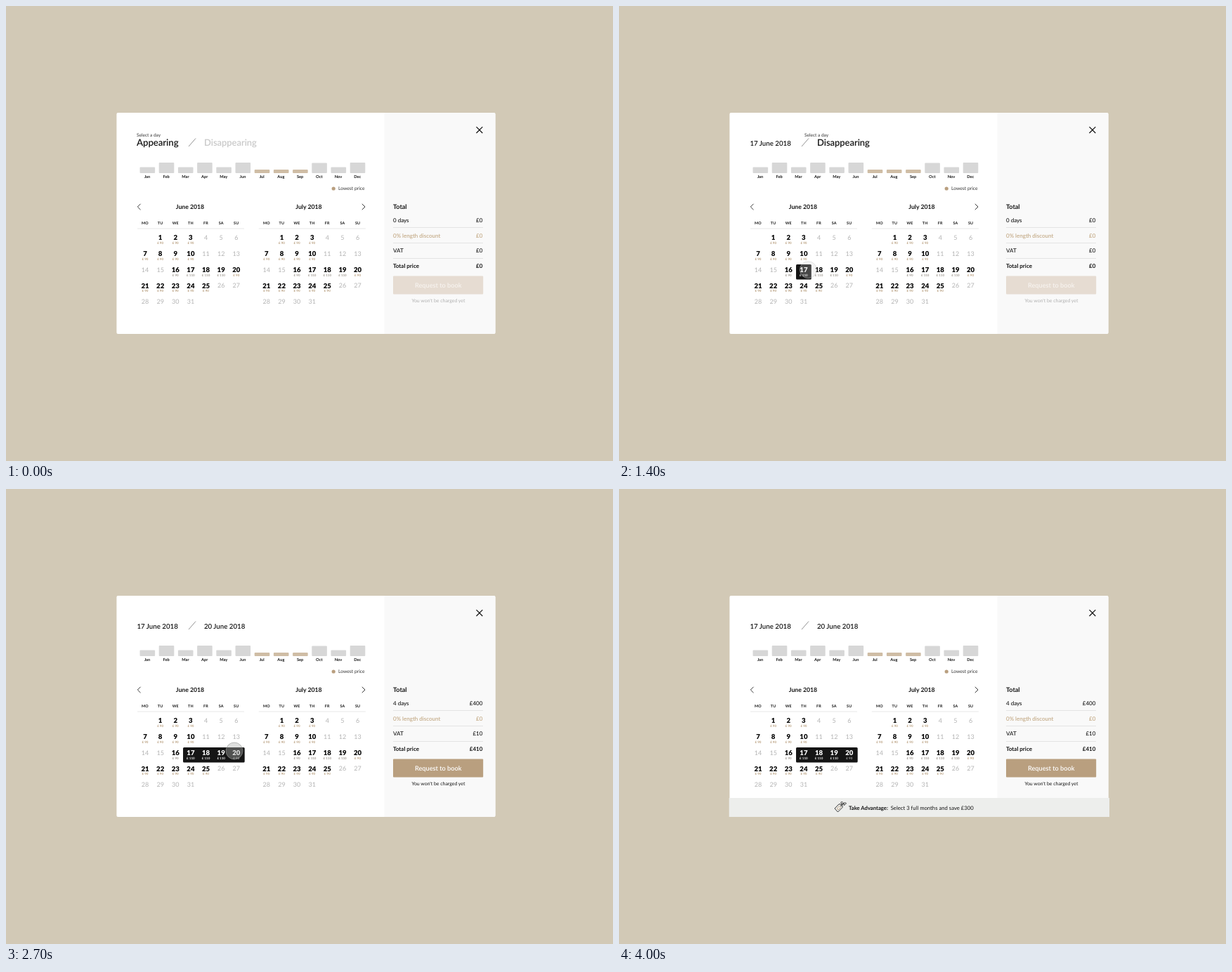
Recreate the animation shown at these times as an HTML page with a canvas. Size 864 by 648 pixels, loop 4660 ms.

```html
<!DOCTYPE html>
<html lang="en">
<head>
<meta charset="utf-8">
<title>Booking calendar</title>
<style>
html, body { margin: 0; width: 100%; height: 100%; overflow: hidden; background: #d2c9b6; }
canvas { display: block; }
</style>
</head>
<body>
<canvas id="stage" width="864" height="648"></canvas>
<script>
const ctx = document.getElementById('stage').getContext('2d');
const LOOP = 4660;
const INK = '#151515', TAN = '#b99f7f', PALE = '#b4b4b4', RULE = '#e2e2e2';
const PICK_START = 1240, PICK_END = 2540;

const clamp = v => Math.min(1, Math.max(0, v));
const span = (t, from, to) => clamp((t - from) / (to - from));
const lerp = (a, b, k) => a + (b - a) * k;
const easeOut = (k, power = 2) => 1 - (1 - k) ** power;
const easeInOut = k => k < .5 ? 4 * k ** 3 : 1 - 4 * (1 - k) ** 3;
const mix = (a, b, k) => `rgb(${a.map((v, i) => Math.round(lerp(v, b[i], k)))})`;

function text(str, x, y, size, { weight = 400, color = INK, align = 'left', spacing = 0 } = {}) {
  ctx.font = `${weight} ${size}px Lato, sans-serif`;
  ctx.letterSpacing = spacing + 'px';
  ctx.textAlign = align;
  ctx.fillStyle = color;
  ctx.fillText(str, x, y);
}

function box(x, y, w, h, color, radius = 0) {
  ctx.fillStyle = color;
  ctx.beginPath();
  ctx.roundRect(x, y, w, h, radius);
  ctx.fill();
}

function line(points, color, width = 1) {
  ctx.strokeStyle = color;
  ctx.lineWidth = width;
  ctx.beginPath();
  points.forEach(([x, y]) => ctx.lineTo(x, y));
  ctx.stroke();
}

function disc(x, y, r, color) {
  ctx.fillStyle = color;
  ctx.beginPath();
  ctx.arc(x, y, r, 0, 7);
  ctx.fill();
}

function drawHeading(t) {
  const started = t >= PICK_START, ended = t >= PICK_END;
  const title = { weight: 600, spacing: -.05 };
  if (started) text('17 June 2018', 186.5, 199, 9.7, { weight: 600 });
  else text('Appearing', 186, 199, 13.2, title);

  if (ended) text('20 June 2018', 282, 199, 9.7, { weight: 600 });
  else text('Disappearing', 282, 199, 13, { ...title, color: started ? INK : '#c9c9c9' });

  const slide = easeOut(span(t, PICK_START, 1540), 2.2);
  ctx.globalAlpha = 1 - span(t, PICK_END, 2640);
  text('Select a day', lerp(186, 282, slide), 186, 6.5, { color: '#333' });
  ctx.globalAlpha = 1;
  line([[260, 200], [270, 188.5]], '#777', .8);
}

function drawMonths() {
  const names = 'Jan Feb Mar Apr May Jun Jul Aug Sep Oct Nov Dec'.split(' ');
  const heights = [8.5, 15, 8.5, 15, 8.5, 15, 5, 5, 5, 14.5, 8.5, 15];
  names.forEach((name, i) => {
    const x = 201.3 + i * 27.2, h = heights[i];
    box(x - 10.8, 238 - h, 21.6, h, h === 5 ? '#cfbda5' : '#d7d7d7', 1);
    text(name, x - .3, 245.3, 5.7, { weight: 700, align: 'center' });
  });
  disc(466.2, 260, 2.6, TAN);
  text('Lowest price', 473, 262.3, 6.75, { color: '#333' });
}

function drawCalendar(left, name, nameX, t, selectable) {
  const column = i => left + 11 + i * 21.63;
  text(name, nameX, 289, 8.7, { weight: 700, align: 'center' });
  'MO TU WE TH FR SA SU'.split(' ').forEach((day, i) =>
    text(day, column(i), 311, 5.4, { weight: 700, align: 'center', spacing: .2 }));
  line([[left, 317], [left + 152, 317]], RULE, .8);

  let last = 0;
  if (selectable && t >= PICK_START) {
    last = t >= PICK_END ? 20 : 17;
    box(252, 368, last === 20 ? 87.7 : 21.8, 21.5, INK, 1.5);
  }

  for (let day = 1; day <= 31; day++) {
    const x = column(day % 7), y = 330 + Math.floor(day / 7) * 22.7;
    const open = day <= 3 || day >= 7 && day <= 10 || day >= 16 && day <= 25;
    if (!open) {
      text(day, x, y + 3.3, 9, { color: PALE, align: 'center' });
      continue;
    }
    const chosen = day >= 17 && day <= last;
    const peak = day >= 17 && day <= 19;
    const gray = day === 16 || peak;
    text(day, x, y + 3.4, 9.6, { weight: 900, align: 'center', color: chosen ? '#fff' : '#000' });
    text(peak ? '£ 110' : '£ 90', x, y + 9.1, 4.5, {
      weight: 700, align: 'center',
      color: chosen ? (peak ? '#eee' : '#aaa') : gray ? '#a09a92' : TAN
    });
  }
}

function drawSummary(t) {
  const done = t >= PICK_END, fade = span(t, PICK_END, 2640);
  box(538.5, 152, 158, 315, '#f9f9f9', [0, 2, 2, 0]);
  line([[669.5, 172.2], [678.3, 181]], '#111', 1.2);
  line([[678.3, 172.2], [669.5, 181]], '#111', 1.2);
  text('Total', 551, 288.6, 9, { weight: 700 });

  const rows = [
    [done ? '4 days' : '0 days', done ? '£400' : '£0', 308.2, 500, INK],
    ['0% length discount', '£0', 329.8, 500, '#c0a57f'],
    ['VAT', done ? '£10' : '£0', 351.2, 500, INK],
    ['Total price', done ? '£410' : '£0', 373.4, 700, INK]
  ];
  rows.forEach(([label, price, y, weight, color], i) => {
    text(label, 551, y, 8, { weight, color });
    text(price, 678.3, y, 8, { weight, color, align: 'right' });
    if (i < 3) line([[551, 315.5 + i * 22], [679, 315.5 + i * 22]], RULE, .9);
  });

  box(551, 384.5, 128.2, 26, mix([230, 220, 210], [185, 159, 127], fade), 1);
  text('Request to book', 615.2, 400.5, 9.2, {
    weight: 600, align: 'center', color: mix([247, 243, 239], [255, 255, 255], fade)
  });
  text("You won't be charged yet", 615.4, 421.7, 6.9, {
    align: 'center', color: mix([176, 176, 176], [21, 21, 21], fade)
  });
}

function drawTag() {
  ctx.lineJoin = 'round';
  const tag = [[307, 455], [313, 448.8], [318, 449.2], [318, 453.5], [311.5, 460], [307, 455]];
  line(tag, '#222', .9);
  line([[310, 455], [313.6, 451.4], [315.6, 453.4], [312, 457], [310, 455]], TAN, .9);
  disc(316, 451.2, .8, '#222');
  ctx.strokeStyle = '#222';
  ctx.lineWidth = .8;
  ctx.beginPath();
  ctx.moveTo(316, 451);
  ctx.quadraticCurveTo(317, 448, 319.5, 448);
  ctx.ellipse(317.6, 447, 2, 1.2, .5, 0, 6.3);
  ctx.moveTo(323.3, 448);
  ctx.ellipse(321.4, 448, 1.9, 1.2, -.3, 0, 6.3);
  ctx.moveTo(319.5, 448);
  ctx.lineTo(321, 451);
  ctx.stroke();
}

function drawOffer(t) {
  const rise = easeInOut(span(t, 2760, 3260));
  if (!rise) return;
  ctx.save();
  ctx.beginPath();
  ctx.rect(150, 430, 560, 37);
  ctx.clip();
  ctx.translate(0, 27 * (1 - rise));
  box(156.7, 440, 541.3, 27, '#edeeec');
  drawTag();
  text('Take Advantage:', 327, 456.6, 7.7, { weight: 700 });
  text('Select 3 full months and save £300', 386.7, 456.6, 7.7);
  ctx.restore();
}

// Each leg: start, end, from point, to point, easing per axis
const legs = [
  [240, 360, [776, 18], [403, 287.5], k => [k, k]],
  [520, 1100, [403, 287.5], [269, 375.7], k => [easeOut(k, 1.6), easeOut(k, 1.3)]],
  [1340, 1840, [269, 375.7], [325, 373], k => [easeInOut(k), easeInOut(k)]],
  [3460, 3660, [325, 373], [735, 53], k => [easeInOut(k), easeInOut(k)]],
  [3880, 4000, [735, 53], [825, -22], k => [k, k]]
];

function drawCursor(t) {
  if (t < 240 || t >= 4000) return;
  const [from, to, a, b, ease] = legs.filter(leg => t >= leg[0]).pop();
  const [kx, ky] = ease(span(t, from, to));
  const x = lerp(a[0], b[0], kx), y = lerp(a[1], b[1], ky);
  const pressed = t >= 2320;
  disc(x, y, 12, pressed ? 'rgba(172,174,172,.4)' : 'rgba(212,212,212,.26)');
  ctx.strokeStyle = pressed ? 'rgba(150,152,150,.75)' : 'rgba(200,200,200,.6)';
  ctx.lineWidth = .8;
  ctx.stroke();
}

function draw(t) {
  ctx.textRendering = 'geometricPrecision';
  box(0, 0, 864, 648, '#d2c9b6');
  box(157.4, 152, 539.1, 315, '#fff', 2);
  drawSummary(t);
  drawHeading(t);
  drawMonths();
  line([[191.5, 281.8], [187.3, 286], [191.5, 290.2]], '#222', .9);
  line([[506.8, 281.8], [511, 286], [506.8, 290.2]], '#222', .9);
  drawCalendar(187, 'June 2018', 262, t, true);
  drawCalendar(359.8, 'July 2018', 431, t, false);
  drawOffer(t);
  drawCursor(t);
}

const start = performance.now();
function tick() {
  const t = (performance.now() - start) % LOOP;
  draw(Math.floor(t / 20) * 20);
  requestAnimationFrame(tick);
}
tick();
</script>
</body>
</html>
```
